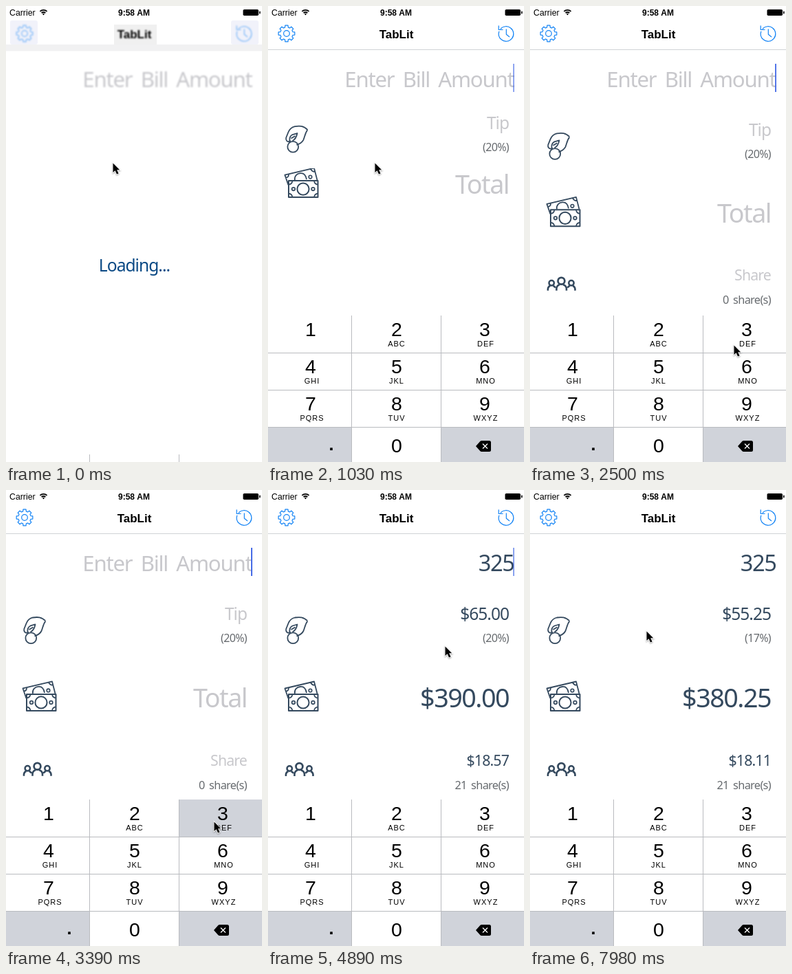
An HTML page with a canvas for the animation above (8 s loop, 372 px wide and 663 px high).

```html
<!DOCTYPE html>
<html lang="en">
<head>
<meta charset="utf-8">
<title>Tip calculator</title>
<style>
html, body { margin: 0; width: 100%; height: 100%; overflow: hidden; background: #fff; }
canvas { display: block; width: 372px; height: 663px; }
</style>
</head>
<body>
<canvas id="stage"></canvas>
<script>
const W = 372, H = 663, LOOP = 8000;
const SLATE = '#34495e', BLUE = '#1283f5', HINT = '#c8c8cc', GREY = '#666a6e', KEY = '#d0d3da';
const HUMAN = '"Noto Sans", "Open Sans", sans-serif';
const SYSTEM = '"Liberation Sans", Arial, sans-serif';
const canvas = document.getElementById('stage');
const ctx = canvas.getContext('2d');
const dpr = window.devicePixelRatio || 1;
canvas.width = W * dpr;
canvas.height = H * dpr;

const clamp = v => Math.max(0, Math.min(1, v));
const ramp = (t, a, b) => clamp((t - a) / (b - a));
const smooth = v => v * v * (3 - 2 * v);
const decay = (t, from, rate) => Math.exp((from - t) / rate);

// Last entry whose time has come
const at = (list, t) => list.filter(e => e[0] <= t).pop();

const BILLS = [[0, ''], [3520, '3'], [3960, '32'], [4420, '325']];
const TIPS = [[0, 20], [5860, 19], [6850, 18], [7380, 17]];
const PRESSES = [[3380, 3520, 3], [3800, 3960, 2], [4270, 4420, 5]];
const POINTER = [
  [0, 155, 228], [1400, 155, 228], [2150, 299, 498], [2500, 296, 493], [2980, 302, 482],
  [3540, 302, 482], [3780, 222, 479], [3980, 222, 479], [4220, 208, 510], [4680, 208, 510],
  [4890, 257, 227], [5720, 189, 205], [6510, 174, 197], [6900, 170, 200], [7400, 113, 208],
  [7960, 169, 205], [8000, 169, 205]
];

function text(str, x, y, size, color, opt = {}) {
  ctx.font = `${opt.weight || 400} ${size}px ${opt.font || SYSTEM}`;
  ctx.letterSpacing = (opt.track || 0) + 'px';
  ctx.wordSpacing = (opt.gap || 0) + 'px';
  ctx.textAlign = opt.align || 'center';
  ctx.fillStyle = color;
  ctx.fillText(str, x, y);
}

function label(str, x, y, size, color, align = 'right') {
  text(str, x, y, size, color, { font: HUMAN, align, track: -0.04 * size, gap: 0.17 * size });
}

function stroke(d, color, width) {
  ctx.strokeStyle = color;
  ctx.lineWidth = width;
  ctx.lineJoin = 'round';
  ctx.stroke(new Path2D(d));
}

function ring(x, y, r, color, width, a = 0, b = Math.PI * 2) {
  ctx.beginPath();
  ctx.arc(x, y, r, a, b);
  ctx.strokeStyle = color;
  ctx.lineWidth = width;
  ctx.stroke();
}

function box(x, y, w, h, color) {
  ctx.fillStyle = color;
  ctx.fillRect(x, y, w, h);
}

function pill(x, y, w, h, r, color) {
  ctx.beginPath();
  ctx.roundRect(x, y, w, h, r);
  ctx.fillStyle = color;
  ctx.fill();
}

function statusBar() {
  text('Carrier', 5, 14, 12.3, '#000', { align: 'left' });
  text('9:58 AM', 186, 14, 12, '#000', { weight: 700 });
  for (const r of [4, 7.2]) ring(54.5, 13, r, '#000', 1.8, -2.36, -0.78);
  ctx.beginPath();
  ctx.moveTo(54.5, 13.4);
  ctx.arc(54.5, 13, 2.2, -2.36, -0.78);
  ctx.fillStyle = '#000';
  ctx.fill();
  pill(344.5, 5, 22.5, 9, 1.8, '#000');
  pill(368, 7.5, 1.6, 4, 0.8, '#000');
}

function gear(x, y) {
  ctx.beginPath();
  for (let i = 0; i < 8; i++) {
    const a = i * Math.PI / 4;
    for (const [da, r] of [[-0.26, 9.2], [-0.17, 12], [0.17, 12], [0.26, 9.2]])
      ctx.lineTo(x + r * Math.sin(a + da), y - r * Math.cos(a + da));
  }
  ctx.closePath();
  ctx.strokeStyle = BLUE;
  ctx.lineWidth = 1.2;
  ctx.lineJoin = 'round';
  ctx.stroke();
  ring(x, y, 4.3, BLUE, 1.2);
}

function history() {
  ring(346, 40.5, 10.8, BLUE, 1.2, -2.45, 3.5);
  stroke('M335.2 28.5V34.5H341.5M346.3 33.5V41.3L351 45', BLUE, 1.2);
}

function navBar(clear) {
  if (clear < 1) {
    ctx.globalAlpha = 1 - clear;
    box(0, 56, W, 9.5, '#f1f1f2');
    pill(6, 21, 40, 35, 3, '#f1f2fa');
    pill(327, 21, 40, 35, 3, '#f1f2fa');
    box(157, 27, 62, 29, '#f0f0f0');
    ctx.globalAlpha = clear;
  }
  box(0, 63, W, 1, '#cfd3d6');
  ctx.globalAlpha = 0.55 + 0.45 * clear;
  if (clear < 1) ctx.filter = `blur(${1.3 * (1 - clear)}px)`;
  gear(27, 40);
  history();
  ctx.globalAlpha = 1;
  text('TabLit', 186.5, 47, 17, '#000', { weight: 700 });
}

function hand() {
  stroke('M57.5 190.5C52 184.5 46 184.5 39 185.5C33 187 31 190 29.5 194L26.3 202' +
    'C25.5 206 28 208.5 31.5 207.5L33 206.5M57.5 190.5C54 195 53.5 200 51.5 205' +
    'C49 210 46 210.5 41.5 212.5M31.5 207C31 203 32.5 199 35.5 197.5L42.5 195.5' +
    'C41.5 201 39.5 204.5 35.5 206.5M33.5 203L39.5 199.5', SLATE, 1.8);
  ring(36.3, 215.2, 7.9, SLATE, 1.8);
}

function notes() {
  stroke('M29.5 303L24.5 288.5L67 278.5L71.5 296M39 296C38 290 42 286.5 47 286' +
    'C52 285.5 55 289 56 295M25.5 293C29 292.5 30.5 290 30 287M62 280C63.5 283 66 284 68.5 283.5', SLATE, 1.8);
  ring(61.5, 291.5, 2.3, SLATE, 1.6);
  ctx.strokeStyle = SLATE;
  ctx.lineWidth = 2;
  ctx.strokeRect(30, 297, 42.5, 24);
  ring(51, 309, 8.6, SLATE, 2);
  ring(37, 309, 2.3, SLATE, 1.7);
  ring(65.5, 309, 2.3, SLATE, 1.7);
  stroke('M30 302.5Q35 302 35.5 297M67 297Q67.5 302 72.5 302.5M30 315.5Q35 316 35.5 321M67 321Q67.5 316 72.5 315.5', SLATE, 1.7);
}

function people() {
  ring(45.5, 402, 4.9, SLATE, 2.8);
  ring(31.3, 405, 3.7, SLATE, 2.5);
  ring(60, 405, 3.7, SLATE, 2.5);
  stroke('M38.5 416V413Q39 408.5 43 407.5M48 407.5Q52.5 408.5 53 413V416' +
    'M26 416V413.5Q26.5 410 29.5 409M33.5 409Q36 410 37 412' +
    'M65.5 416V413.5Q65 410 62 409M58 409Q55.5 410 54.5 412', SLATE, 2.6);
}

// A table row, shifted by dy, faded, and cut to the band top..bottom
function row(dy, alpha, top, bottom, draw) {
  if (alpha <= 0) return;
  ctx.save();
  ctx.globalAlpha = alpha;
  ctx.beginPath();
  ctx.rect(0, top, W, bottom - top);
  ctx.clip();
  ctx.translate(0, dy);
  draw();
  ctx.restore();
}

function caretAlpha(t) {
  if (t > 3080 && t < 4840) return 1;
  const p = (t < 3080 ? t + 510 : t - 4840) % 1000;
  return p < 450 ? 1 - ramp(p, 0, 140) : ramp(p, 450, 600);
}

function rows(t) {
  const bill = at(BILLS, t)[1], rate = at(TIPS, t)[1];
  const tip = bill * rate / 100, total = bill * 1 + tip;
  const shares = bill && Math.max(1, Math.floor(total / 18));
  const money = (v, hint, y, size) =>
    label(bill ? '$' + v.toFixed(2) : hint, 350, y, size, bill ? SLATE : HINT);
  const squeeze = Math.min(1.4, decay(t, 1030, 350));
  const shown = ramp(t, 550, 900);

  row(-10.5 * squeeze, shown, 66, 300, () => {
    hand();
    money(tip, 'Tip', 189, 24.5);
    label(`(${rate}%)`, 350, 221, 16, GREY);
  });
  row(-43 * squeeze, shown, 276 - 40 * squeeze, 450, () => {
    notes();
    money(total, 'Total', 316, 37.7);
  });
  row(-60 * decay(t, 1200, 400), ramp(t, 1200, 1600), 330, 450, () => {
    people();
    money(total / (shares || 1), 'Share', 401, 21.3);
    label(`${shares || 0} share(s)`, 350, 435, 16.3, GREY);
  });
}

function keyboard(t) {
  const cols = [0, 122, 252, W], mids = [62, 187, 315], subMids = [64, 187, 316.5];
  const subs = ['', 'ABC', 'DEF', 'GHI', 'JKL', 'MNO', 'PQRS', 'TUV', 'WXYZ'];
  const down = PRESSES.find(p => t >= p[0] && t < p[1]);
  ctx.save();
  ctx.translate(0, 202 * Math.pow(1 - ramp(t, 60, 560), 3));
  box(0, 450, W, 213, '#fff');
  box(0, 612, 122, 51, KEY);
  box(252, 612, 120, 51, KEY);
  if (down) {
    const i = down[2] - 1, c = i % 3;
    box(cols[c], 450 + 54 * Math.floor(i / 3), cols[c + 1] - cols[c], 54, KEY);
  }
  for (const y of [504, 558, 612]) box(0, y, W, 1, '#b9bbbf');
  for (const x of [121, 251]) box(x, 450, 1, 213, '#b9bbbf');
  subs.forEach((sub, i) => {
    const c = i % 3, y = 54 * Math.floor(i / 3);
    text(i + 1, mids[c], 480 + y, 28.5, '#000');
    text(sub, subMids[c], 495 + y, 11, '#000', { track: 1 });
  });
  text('0', 187, 649, 28.5, '#000');
  box(90.2, 642.3, 3.6, 3.7, '#000');
  ctx.fillStyle = '#000';
  ctx.fill(new Path2D('M302 640L308 633.2Q309 632 310.5 632H321.5Q324 632 324 634.5V645.5Q324 648 321.5 648H310.5Q309 648 308 646.8Z'));
  stroke('M312 636.5L319 643.5M319 636.5L312 643.5', '#fff', 1.3);
  ctx.restore();
}

function pointer(t) {
  const i = POINTER.findIndex(p => p[0] > t);
  const a = POINTER[i - 1], b = POINTER[i];
  const k = smooth(ramp(t, a[0], b[0]));
  ctx.save();
  ctx.translate(a[1] + (b[1] - a[1]) * k, a[2] + (b[2] - a[2]) * k);
  const arrow = new Path2D('M0.5 0.5V14L3.6 11.2L6 16.5L8.6 15.4L6.2 10.3H10.2Z');
  ctx.shadowColor = 'rgba(0,0,0,.35)';
  ctx.shadowBlur = 2 * dpr;
  ctx.shadowOffsetY = dpr;
  ctx.strokeStyle = '#fff';
  ctx.lineWidth = 1.8;
  ctx.stroke(arrow);
  ctx.shadowColor = 'transparent';
  ctx.fillStyle = '#000';
  ctx.fill(arrow);
  ctx.restore();
}

function draw(t) {
  const clear = ramp(t, 150, 550);
  const bill = at(BILLS, t)[1];
  ctx.setTransform(dpr, 0, 0, dpr, 0, 0);
  box(0, 0, W, H, '#fff');
  statusBar();
  ctx.save();
  navBar(clear);
  label(bill || 'Enter Bill Amount', 357.5, 118, bill ? 32.5 : 31.2, bill ? SLATE : HINT);
  ctx.restore();
  rows(t);
  ctx.globalAlpha = caretAlpha(t) * clear;
  box(356, 84, 2, 41, '#466be6');
  ctx.globalAlpha = 1 - clear;
  label('Loading...', 186.5, 386, 24.6, '#0b4a85', 'center');
  ctx.globalAlpha = 1;
  keyboard(t);
  pointer(t);
}

const start = performance.now();
function tick() {
  draw((performance.now() - start) % LOOP);
  requestAnimationFrame(tick);
}
tick();
</script>
</body>
</html>
```
